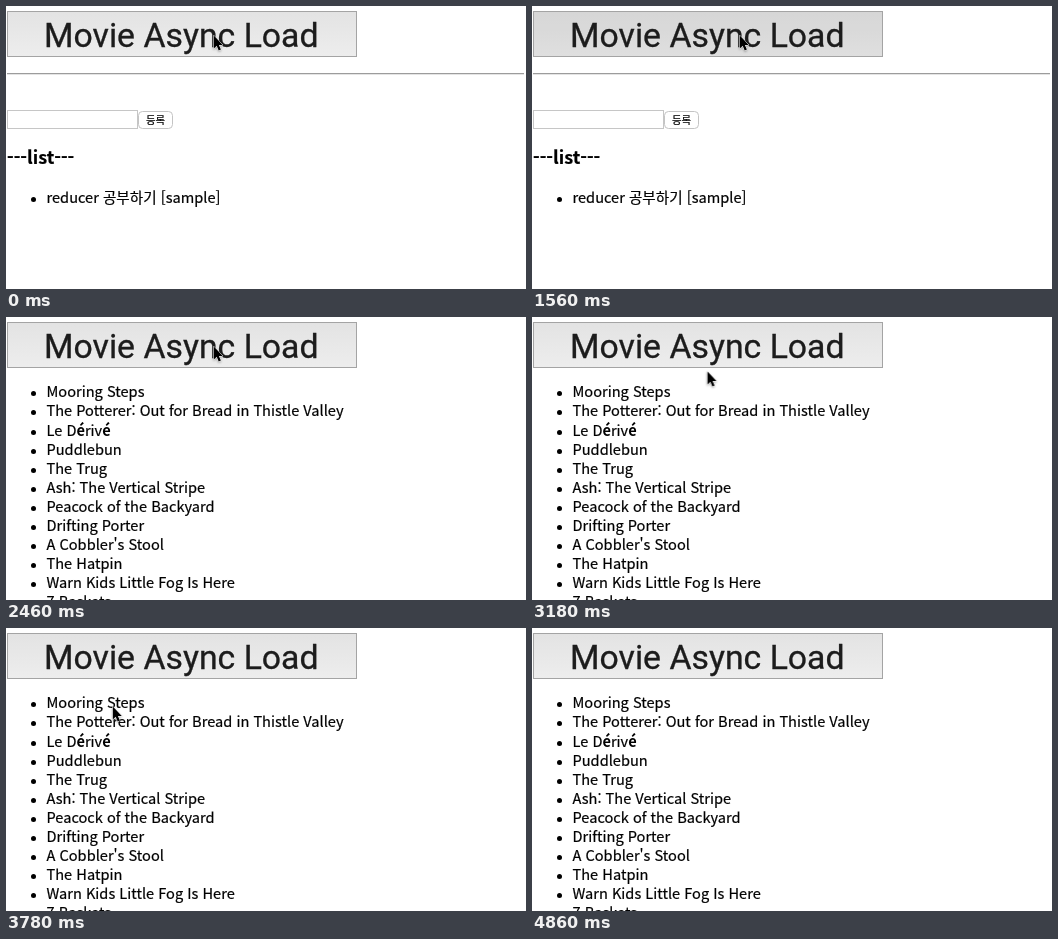
Animation of 520x283 px, one loop 5.16 s. Source, as an HTML page:

```html
<!DOCTYPE html>
<html lang="ko">
<head>
<meta charset="utf-8">
<title>Movie Async Load</title>
<style>
  html, body { margin: 0; width: 100%; height: 100%; overflow: hidden; background: #fff; }
  svg { display: block; width: 520px; height: 283px; }
  text {
    font: 14.6px "Noto Sans CJK KR", "Noto Sans KR", "Noto Sans", sans-serif;
    fill: #000; stroke: #000; stroke-width: .2; white-space: pre;
  }
  #label { font: 33.8px Roboto, Inter, sans-serif; fill: #1c1c1c; stroke: #1c1c1c; stroke-width: .3; }
  .small { font-size: 10.4px; }
  .head { font-size: 18px; font-weight: 700; }
  .accent { font-weight: 700; stroke: none; }
  #cursor { filter: drop-shadow(0 1px 1px rgba(0, 0, 0, .3)); }
</style>
</head>
<body>
<svg viewBox="0 0 520 283">
  <defs>
    <linearGradient id="gray" x2="0" y2="1">
      <stop stop-color="#e3e3e3"/>
      <stop offset="1" stop-color="#ededed"/>
    </linearGradient>
  </defs>

  <rect id="face" x="1.5" y="5.5" width="349" height="45" fill="url(#gray)" stroke="#a4a4a4"/>
  <rect id="shade" x="2" y="6" width="348" height="44"/>
  <text id="label" x="38" y="41">Movie Async Load</text>

  <g id="form">
    <path d="M1 67.5H518" stroke="#9c9c9c"/>
    <path d="M1 68.5H518" stroke="#e4e4e4"/>
    <rect x="1.5" y="104.5" width="130" height="18" fill="#fff" stroke="#c6c6c6"/>
    <rect x="132.5" y="105.5" width="34" height="17" rx="4" fill="#fff" stroke="#c4c4c4"/>
    <text class="small" x="149.5" y="118" text-anchor="middle">등록</text>
    <text class="head" x="1" y="158">---list---</text>
    <circle cx="27.5" cy="193.5" r="2.5"/>
    <text x="40.5" y="197">reducer 공부하기 [sample]</text>
  </g>

  <g id="movies"></g>

  <g id="cursor">
    <path d="M.8 .5V13.5L3.7 10.8L5.7 15.5L7.9 14.6L5.9 10H9.8Z" fill="#000"
          stroke="#fff" stroke-linejoin="round" paint-order="stroke"/>
  </g>
</svg>
<script>
const LOOP = 5160;
const TICK = 60;
const $ = id => document.getElementById(id);

const titles = [
  "Mooring Steps",
  "The Potterer: Out for Bread in Thistle Valley",
  "Le Dérivé",
  "Puddlebun",
  "The Trug",
  "Ash: The Vertical Stripe",
  "Peacock of the Backyard",
  "Drifting Porter",
  "A Cobbler's Stool",
  "The Hatpin",
  "Warn Kids Little Fog Is Here",
  "7 Baskets"
];

// The accented row is one pixel taller than the others.
$("movies").innerHTML = titles.map((title, i) => {
  const y = 80 + 19 * i + (i > 1 ? 1 : 0);
  const text = title.replace(/é/g, '<tspan class="accent">é</tspan>');
  return `<circle cx="27.5" cy="${y - 3.5}" r="2.5"/><text x="40.5" y="${y}">${text}</text>`;
}).join("");

// Plays [time, value] keys: hard changes, or moves in whole ticks.
function play(id, prop, keys, moving = false) {
  const frames = keys.map(([time, value], i) => {
    const next = i + 1 < keys.length ? keys[i + 1][0] : LOOP;
    const steps = moving ? Math.round((next - time) / TICK) : 1;
    return { offset: time / LOOP, [prop]: value, easing: `steps(${steps}, end)` };
  });
  frames.push({ offset: 1, [prop]: keys[keys.length - 1][1] });
  return $(id).animate(frames, { duration: LOOP, iterations: Infinity });
}

const at = (x, y) => `translate(${x}px, ${y}px)`;
const onButton = at(207, 29), low = at(112, 144), rest = at(162, 113);

const animations = [
  play("face", "opacity", [[0, 1], [1740, .6], [2460, 1]]),
  play("label", "opacity", [[0, 1], [1740, .27], [2460, 1]]),
  play("shade", "opacity", [[0, 0], [1560, .06], [1620, .12], [1740, 0]]),
  play("form", "visibility", [[0, "visible"], [2460, "hidden"]]),
  play("movies", "visibility", [[0, "hidden"], [2460, "visible"]]),
  play("cursor", "transform", [
    [0, onButton], [3060, onButton], [3420, at(110, 104)], [3600, low],
    [3780, at(106, 78)], [4020, rest], [4440, rest], [4860, at(73, 300)]
  ], true)
];

// One shared start keeps every part in step.
const start = document.timeline.currentTime || 0;
animations.forEach(a => { a.startTime = start; });
</script>
</body>
</html>
```
